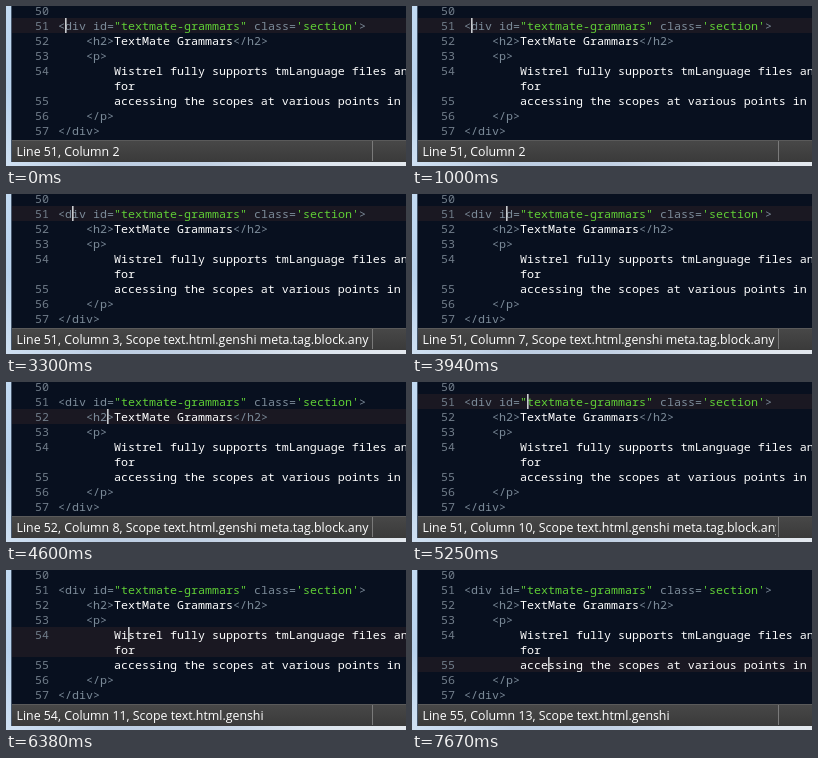
Animation of 400 by 160 pixels, one loop 8000 ms. Source, as an HTML page with a canvas:

```html
<!DOCTYPE html>
<html lang="en">
<head>
<meta charset="utf-8">
<title>Scope in the status bar</title>
<style>
html, body { margin: 0; width: 100%; height: 100%; overflow: hidden; background: #08101f; }
canvas { display: block; width: 400px; height: 160px; }
</style>
</head>
<body>
<canvas id="stage" width="400" height="160"></canvas>
<script>
const ctx = document.getElementById('stage').getContext('2d');
const LOOP = 8000, CHAR = 7, ROW = 15, TOP = -3, LEFT = 52, EDGE = 6;
const CODE_FONT = '11.667px "Noto Sans Mono", "DejaVu Sans Mono", monospace';
const UI_FONT = '12.36px "Open Sans", "Noto Sans", sans-serif';
const GREY = '#7d8c9a', GREEN = '#60cf36', WHITE = '#ffffff';
const BASE = 'text.html.genshi', TAG = BASE + ' meta.tag.block.any';

// Visual rows: line number, indent in characters, coloured pieces.
const rows = [
  [50, 0, []],
  [51, 0, [[GREY, '<div id='], [GREEN, '"textmate-grammars"'], [GREY, ' class='],
           [GREEN, "'section'"], [GREY, '>']]],
  [52, 4, [[GREY, '<h2>'], [WHITE, 'TextMate Grammars'], [GREY, '</h2>']]],
  [53, 4, [[GREY, '<p>']]],
  [54, 8, [[WHITE, 'Wistrel fully supports tmLanguage files and']]],
  ['', 8, [[WHITE, 'for']]],
  [55, 8, [[WHITE, 'accessing the scopes at various points in the']]],
  [56, 4, [[GREY, '</p>']]],
  [57, 0, [[GREY, '</div>']]]
];

// Caret moves: start time, line, column, scope.
const moves = [];
function walk(start, line, columns, scope) {
  columns.forEach((col, i) => moves.push({ at: start + i * 160, line, col, scope }));
}
walk(0, 51, [2], '');
walk(2000, 51, [1], TAG);
walk(2330, 51, [2, 3, 4], TAG);
walk(2980, 51, [3, 2, 3, 4, 5, 6, 7], TAG);
walk(4270, 52, [7], TAG);
walk(4600, 52, [8], TAG);
walk(4760, 51, [8, 9], TAG);
walk(5250, 51, [10], TAG);
walk(5580, 51, [11, 12], TAG);
walk(5900, 52, [12], BASE);
walk(6060, 53, [8], BASE);
walk(6220, 54, [12, 11, 10], BASE);
moves[moves.length - 1].label = 11; // the status bar lags one step here
walk(6700, 54, [10], BASE);
walk(7030, 54, [10], BASE);
Object.assign(moves[moves.length - 1], { wrapped: true, label: 80 });
walk(7190, 55, [10, 11, 12, 13], BASE);

function rect(color, x, y, w, h) {
  ctx.fillStyle = color;
  ctx.fillRect(x, y, w, h);
}

function text(str, x, y, color, font) {
  ctx.font = font;
  ctx.fillStyle = color;
  ctx.fillText(str, x, y);
}

function gradient(x0, y0, x1, y1, ...colors) {
  const g = ctx.createLinearGradient(x0, y0, x1, y1);
  colors.forEach((c, i) => g.addColorStop(i / (colors.length - 1), c));
  return g;
}

function drawCode(caret) {
  rect('#08101f', EDGE, 0, 400 - EDGE, 134);
  const active = rows.findIndex(r => r[0] === caret.line);
  const span = caret.line === 54 ? 2 : 1;
  rect('#1a1822', EDGE, TOP + active * ROW, 400 - EDGE, span * ROW);
  rows.forEach(([number, indent, pieces], i) => {
    const base = TOP + i * ROW + 12;
    text(String(number), 29, base, '#717d8a', CODE_FONT);
    let x = LEFT + indent * CHAR;
    for (const [color, str] of pieces) {
      text(str, x, base, color, CODE_FONT);
      x += str.length * CHAR;
    }
  });
  const row = active + (caret.wrapped ? 1 : 0);
  rect('#c9ccd0', LEFT + (caret.col - 1) * CHAR, TOP + row * ROW, 1.6, ROW);
}

function drawStatus(caret) {
  rect(gradient(0, 134, 0, 156, '#484848', '#3a3a3a'), EDGE, 134, 400 - EDGE, 22);
  rect('#5a5a5a', EDGE, 134, 400 - EDGE, 1);
  rect('#7a7a7a', 366, 135, 1, 20);
  ctx.save();
  ctx.beginPath();
  ctx.rect(EDGE, 134, 358, 22);
  ctx.clip();
  const place = `Line ${caret.line}, Column ${caret.label || caret.col}`;
  const scope = caret.scope && `, Scope ${caret.scope}`;
  text(place + scope, 10.5, 150, WHITE, UI_FONT);
  ctx.restore();
}

function drawGlass() {
  rect(gradient(0, 0, 0, 160, '#c3dbf3', '#b9d3ee', '#cfe0f2'), 0, 0, EDGE - 1, 160);
  rect(gradient(0, 0, 400, 0, '#cfe0f2', '#bccde2', '#c2d1e4', '#dbe4ee', '#e3e8ee'), 0, 156, 400, 4);
  rect('#46566a', EDGE - 1, 0, 1, 156);
}

function draw(now) {
  const t = now % LOOP;
  const caret = moves.filter(m => m.at <= t).pop();
  drawCode(caret);
  drawStatus(caret);
  drawGlass();
}

function tick() {
  draw(performance.now());
  requestAnimationFrame(tick);
}
tick();
</script>
</body>
</html>
```
